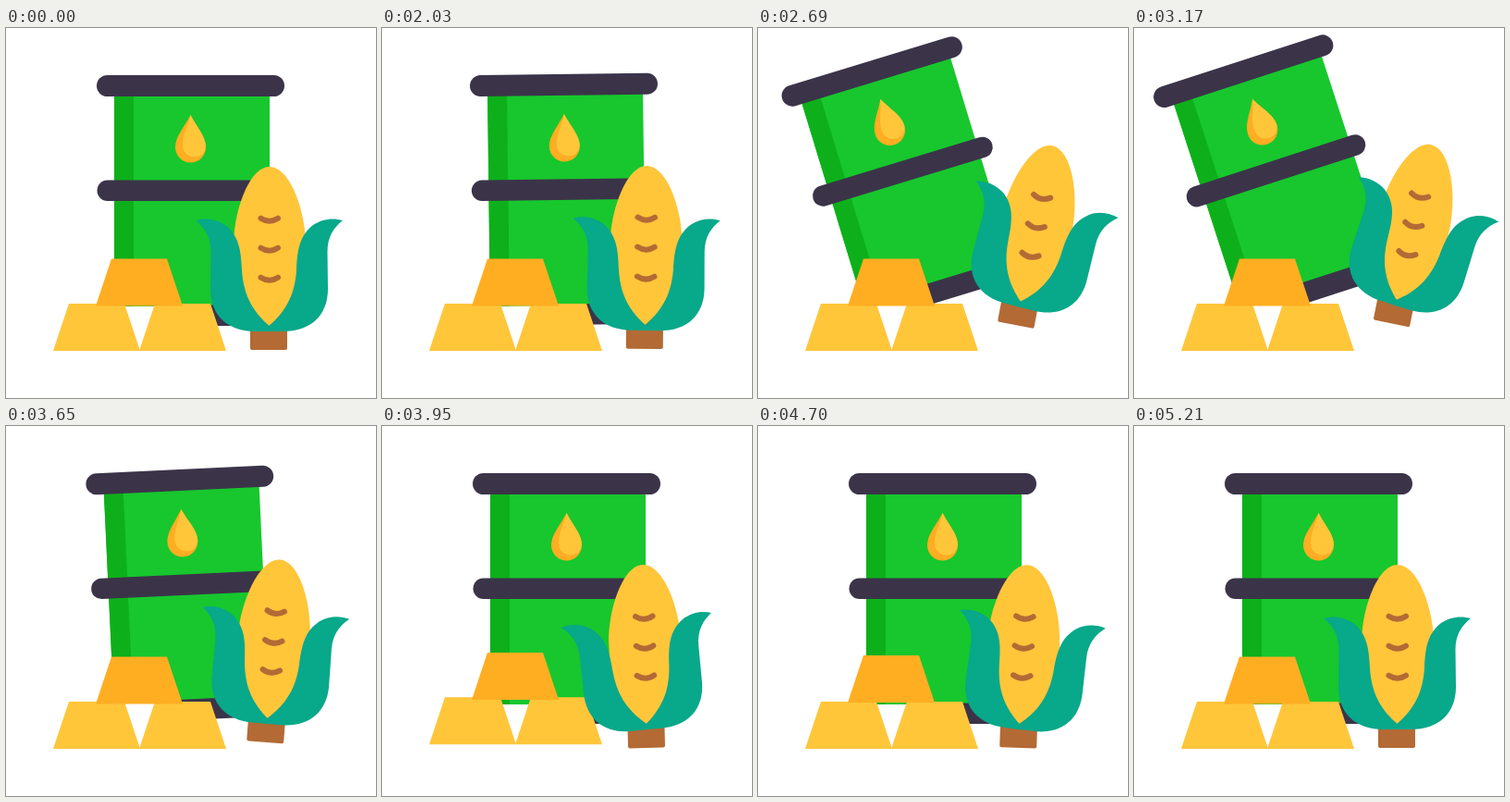
Recreate the animation shown at these times as an HTML page. Size 400x400 px, loop 5240 ms.

```html
<!DOCTYPE html>
<html lang="en">
<head>
<meta charset="utf-8">
<title>Commodities</title>
<style>
html, body { margin: 0; height: 100%; overflow: hidden; background: #fff; }
svg { display: block; width: 100vw; height: 100vh; }
</style>
</head>
<body>
<svg viewBox="0 0 400 400">
  <defs>
    <path id="leaf" fill="#08a88a" d="M284.5 322C300 308 312 292 314 262C315 238 318 224 332 213C342 206 354 205 364 208C354 216 347.5 226 347.5 242L348 282C348 312 328 328 300 328H280Z"/>
    <path id="ingot" d="M17 0H77L94 51H0Z"/>
    <path id="kernel" d="M275.5 205.7Q284.8 211.7 294 205.7" fill="none" stroke="#b36a35" stroke-width="6" stroke-linecap="round"/>
  </defs>

  <g id="barrel">
    <path fill="#17c72d" d="M117 62H285V301H117Z"/>
    <path fill="#0db01a" d="M117 62H138V301H117Z"/>
    <g fill="#3b3449">
      <rect x="98" y="51" width="203" height="23" rx="11.5"/>
      <rect x="98.5" y="164.5" width="202.5" height="22.5" rx="11.25"/>
      <rect x="165" y="299.5" width="136" height="22.5"/>
    </g>
    <path fill="#ffad22" d="M199.5 94C206 107 216 117 216 129A16.5 16.5 0 0 1 183 129C183 117 193 107 199.5 94Z"/>
    <path fill="#ffc63a" d="M199.5 94C206 107 216 117 216 128C215 136 210 139.5 204 139.5C196 139.5 191 134 191 126C191 115 197 106 199.5 94Z"/>
  </g>

  <g id="left" fill="#ffc63a"><use href="#ingot" x="51" y="298"/></g>
  <g id="right" fill="#ffc63a"><use href="#ingot" x="144" y="298"/></g>
  <g id="top" fill="#ffae22"><use href="#ingot" x="97" y="249.5"/></g>

  <g id="corn">
    <rect x="264" y="316" width="40" height="32" rx="2" fill="#b36a35"/>
    <g id="cob">
      <path fill="#ffc63a" d="M284.8 150C263 150 246 198 246 235C246 285 262 306 284.5 322C307 306 324 285 324 235C324 198 307 150 284.8 150Z"/>
      <use href="#kernel"/>
      <use href="#kernel" y="32"/>
      <use href="#kernel" y="64"/>
    </g>
    <g id="leafL"><use href="#leaf" transform="translate(569) scale(-1 1)"/></g>
    <g id="leafR"><use href="#leaf"/></g>
  </g>
</svg>
<script>
const LOOP = 5240, START = 2000, STEP = 30;

const push = s => 1 - (1 - s) ** 4.5 * (1 + 3.1 * s);
const quadIn = s => s * s;
const quadOut = s => s * (2 - s);
const fall = s => s ** 2.5;
const swing = s => (1 - Math.cos(Math.PI * s)) / 2;

// keys: [time, value, easing towards this key]
function tween(u, keys) {
  let [t0, v0] = keys[0];
  for (const [t, v, ease] of keys.slice(1)) {
    if (u < t) return v0 + (v - v0) * ease(Math.max(0, (u - t0) / (t - t0)));
    [t0, v0] = [t, v];
  }
  return v0;
}

function hop(u, from, to, height) {
  const s = Math.min(1, Math.max(0, (u - from) / (to - from)));
  return -4 * height * s * (1 - s);
}

const leafKeys = back => [[0, 0], [40, 17.7, quadOut], [57.5, 0, quadIn],
  [74, back, quadOut], [88, 7.4, swing], [107, 0, swing]];

const set = (id, value) => document.getElementById(id).setAttribute('transform', value);
const turnBase = angle => `rotate(${angle} 284.5 322)`;

function draw(time) {
  const u = Math.max(0, Math.floor((time % LOOP - START) / STEP));

  const tilt = tween(u, [[0, 0], [40, 18, push], [56, 0, fall]]);
  set('barrel', `rotate(${-tilt} 109 311)`);

  set('left', `translate(0 ${hop(u, 57, 83, 5.5)})`);
  set('right', `translate(0 ${hop(u, 57, 81, 5.3)})`);
  set('top', `translate(0 ${hop(u, 58, 92, 7)})`);

  const lift = tween(u, [[0, 0], [40, 1, push], [57, 0, quadIn]]);
  const lean = tween(u, [[0, 0], [40, 11.5, push], [59, 0, quadIn],
    [74, -2.2, quadOut], [88, 2, swing], [107, 0, swing]]);
  const leafL = tween(u, leafKeys(-9.6)) - lean;
  const leafR = tween(u, leafKeys(-6.6)) - lean;
  set('corn', `translate(${10.8 * lift} ${-26.8 * lift}) rotate(${lean} 284.5 265)`);
  set('cob', turnBase(Math.max(0, leafR) * 0.15));
  set('leafL', turnBase(leafL));
  set('leafR', turnBase(leafR));
}

const begin = performance.now();
function frame() {
  draw(performance.now() - begin);
  requestAnimationFrame(frame);
}
frame();
</script>
</body>
</html>
```
